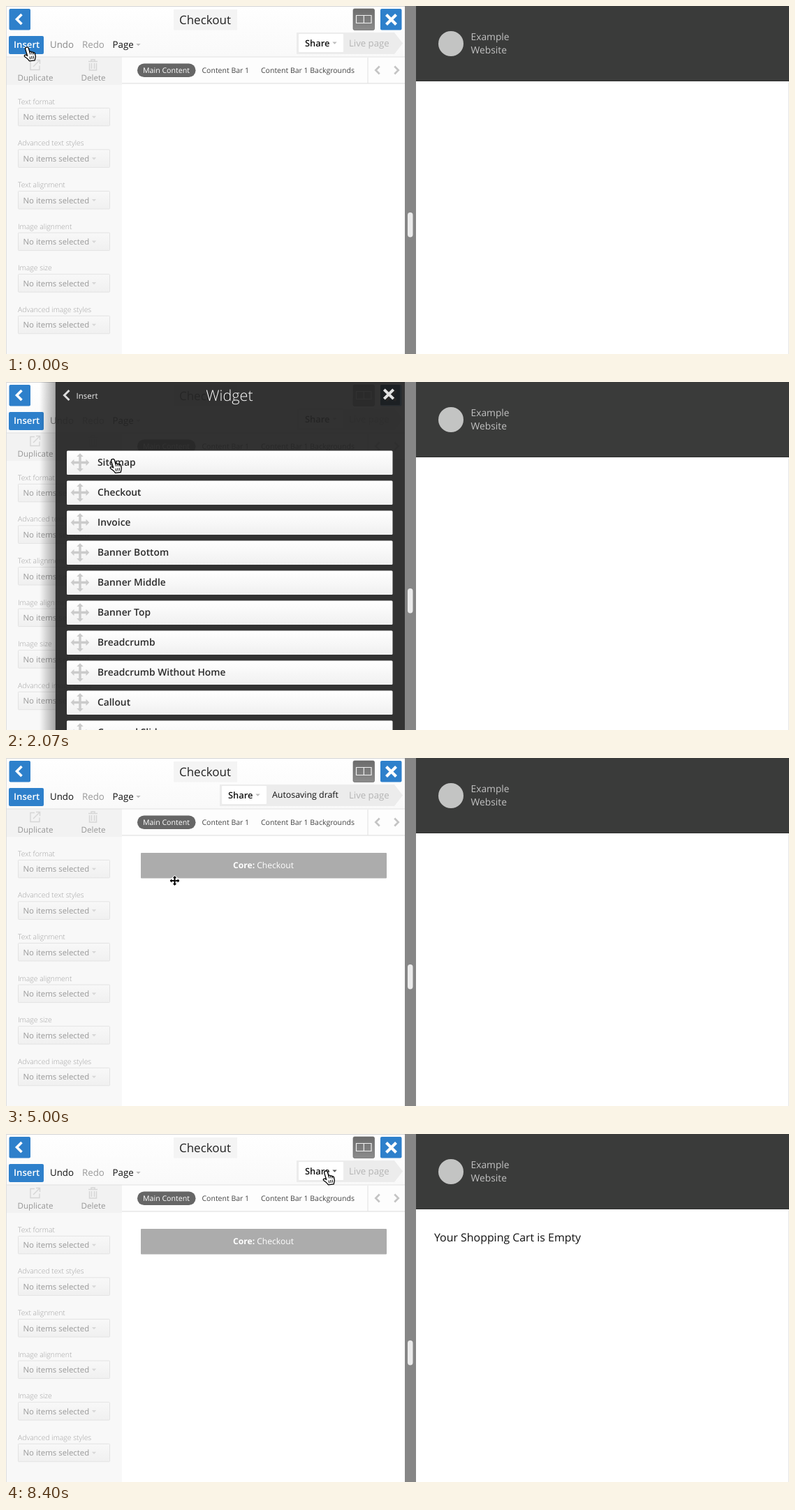
These frames come from a looping animation (1121 px wide and 499 px high, 9.67 s). An HTML page:

```html
<!DOCTYPE html>
<html lang="en">
<head>
<meta charset="utf-8">
<title>Page editor</title>
<style>
html, body { margin: 0; width: 100%; height: 100%; overflow: hidden; background: #fff }
svg { display: block; width: 1121px; height: 499px; font-family: "Open Sans", sans-serif; text-rendering: geometricPrecision }
</style>
</head>
<body>
<svg id="stage" viewBox="0 0 1121 499"></svg>
<script>
const LOOP = 9670;
const BLUE = '#2e80cb';

// Markup helpers. Text is placed by the middle of its capitals.
const text = (s, x, y, size, fill, weight = 400, anchor = 'start') =>
  `<text x="${x}" y="${y + size * .36}" font-size="${size}" fill="${fill}" font-weight="${weight}" text-anchor="${anchor}">${s}</text>`;
const rect = (x, y, w, h, fill, rx = 0, more = '') =>
  `<rect x="${x}" y="${y}" width="${w}" height="${h}" fill="${fill}" rx="${rx}" ${more}/>`;
const line = (d, stroke, w = 1, more = '') =>
  `<path d="${d}" fill="none" stroke="${stroke}" stroke-width="${w}" ${more}/>`;
const group = (id, body, more = '') => `<g id="${id}" ${more}>${body}</g>`;
const caret = (x, y, fill) => `<path d="M${x - 3.2} ${y - 1.6}h6.4l-3.2 3.4z" fill="${fill}"/>`;
const chevron = (x, y, r, dir, stroke, w) =>
  line(`M${x - dir * r / 2} ${y - r}l${dir * r} ${r}l${-dir * r} ${r}`, stroke, w);
const cross = (x, y, r, stroke, w) =>
  line(`M${x - r} ${y - r}l${2 * r} ${2 * r}m0 ${-2 * r}l${-2 * r} ${2 * r}`, stroke, w);

// Four-way arrow of radius r.
const fourWay = (x, y, r, more) => {
  const a = r * .36, b = r * .64, c = r * .13;
  const arm = `M0 0H${c}V${-b}H${a}L0 ${-r}L${-a} ${-b}H${-c}V0z`;
  return `<g transform="translate(${x} ${y})" ${more}>` +
    [0, 90, 180, 270].map(q => `<path d="${arm}" transform="rotate(${q})"/>`).join('') + '</g>';
};
const handle = (x, y) => fourWay(x, y, 13.3, 'fill="#cbcbcb"');

const topBar = rect(0, 0, 571, 73, 'url(#bar)') + rect(0, 0, 571, 1, '#d4d4d4') +
  rect(4.5, 4, 30.5, 30.5, BLUE, 2) + chevron(19, 19, 7, -1, '#fff', 3.6) +
  rect(240, 5, 91, 29.5, '#f4f4f4') + text('Checkout', 285, 19.5, 17, '#222', 400, 'middle') +
  rect(497, 4, 30.5, 30.5, 'url(#grey)', 2, 'stroke="#666" stroke-width=".7"') +
  line('M501.5 13.5h21.5v11h-21.5zM512.3 13.5v11', '#eee', 1.2) +
  group('close', rect(536, 4, 30.5, 30.5, BLUE, 2) + cross(551.5, 19.5, 7, '#fff', 4.2)) +
  rect(4, 43, 50, 26, BLUE, 2) + text('Insert', 11, 55.5, 13.2, '#fff', 600) +
  `<g id="undo">${text('Undo', 63, 55.5, 13.3, 'currentColor')}</g>` +
  text('Redo', 109, 55.5, 13.3, '#999') + text('Page', 152.5, 55.5, 13.3, '#111') + caret(189.5, 55.5, '#bbb');

const ribbon = x => `<path d="M${x} 38H556L568 53.5L556 69H${x}z" fill="#ececec"/>`;
const share = x => rect(x, 40, 64, 26, '#fff', 1) + text('Share', x + 9, 53, 12.9, '#111', 600);
const status =
  group('live', ribbon(416) + share(419) + `<g id="caret">${caret(470.5, 53, 'currentColor')}</g>` +
    text('Live page', 491, 53, 13.2, '#b4b4b4')) +
  group('draft', ribbon(306) + share(309) + caret(360.5, 53, '#bbb') +
    text('Autosaving draft', 381, 53, 12.4, '#111') + text('Live page', 491, 53, 13.2, '#b4b4b4')) +
  group('publish', ribbon(368) + rect(371, 40, 121, 26, '#d9531a', 1) +
    text('Publish Changes', 379.5, 53, 13, '#fff', 600) + text('Preview', 501, 53, 13.1, '#b4b4b4'));

const fields = ['Text format', 'Advanced text styles', 'Text alignment', 'Image alignment', 'Image size', 'Advanced image styles'];
const sidebar = rect(0, 73, 166, 426, '#f8f8f8') + rect(0, 73, 166, 40, '#f2f2f2') +
  line('M41 78.500h-6v13h13v-6M39 87l9-9M43 77.500h5.500v5.500', '#d6d6d6', 1.4) +
  line('M118 79.500h13M122 79v-2h5v2M119.500 82v10h10v-10M122.500 82v8M126.500 82v8', '#d6d6d6', 1.5) +
  text('Duplicate', 16.5, 102.5, 11.6, '#979797') + text('Delete', 107.5, 102.5, 11.6, '#979797') +
  fields.map((s, i) => {
    const y = 159.3 + i * 59.6;
    return text(s, 17, y - 22.3, 10.4, '#a2a2a2', 300) +
      rect(17.5, y - 13, 131, 25.5, 'url(#field)', 1, 'stroke="#e3e3e3"') +
      text('No items selected', 24.5, y, 11.4, '#999') + caret(126, y, '#d8d8d8');
  }).join('') + rect(0, 0, 1, 499, '#dedede');

const tabs = rect(166, 74, 405, 37, '#fdfdfd') + rect(0, 72.5, 571, 1, '#e2e2e2') +
  rect(166, 110.500, 405, 1, '#dcdcdc') + rect(517.5, 74, 1, 37, '#e2e2e2') +
  rect(188, 82.500, 83.5, 19.5, '#666', 9.7) + text('Main Content', 196, 92, 10.6, '#fff') +
  text('Content Bar 1', 280.5, 92, 10.5, '#444') + text('Content Bar 1 Backgrounds', 365, 92, 10.5, '#444') +
  chevron(532, 92, 5.5, -1, '#c4c4c4', 2.6) + chevron(559, 92, 5.5, 1, '#c4c4c4', 2.6);

const widget = group('widget', rect(193, 136, 352, 36.5, '#acacac', 1) +
  text('<tspan font-weight="700">Core:</tspan> Checkout', 368.5, 154, 12.1, '#fff', 400, 'middle'));

// Slide-in panel, in its own coordinates.
const rowBox = i => rect(17, 98.5 + 43 * i, 466.5, 34.5, 'url(#row)', 1.5);
const rowBody = (s, y) => handle(36, y) + text(s, 61, y, 13.8, '#2b2b2b', 600);
const names = ['Sitemap', 'Checkout', 'Invoice', 'Banner Bottom', 'Banner Middle', 'Banner Top',
  'Breadcrumb', 'Breadcrumb Without Home', 'Callout', 'Carousel Slider'];
const panel = group('panel',
  rect(-22, 0, 22, 499, 'url(#shade)') + rect(0.500, 0, 520, 499, '#262626', 0, 'opacity=".94"') +
  group('menu', text('Insert', 250, 19.5, 21.6, '#fff', 300, 'middle') + rowBox(0) + rowBody('Widget', 115.5)) +
  group('list', rect(466, 4, 28, 29, '#000', 1, 'opacity=".25"') + chevron(17, 19, 7, -1, '#ddd', 3) +
    text('Insert', 30.500, 19.5, 11.5, '#eee') + text('Widget', 250, 19.5, 21.6, '#fff', 300, 'middle') +
    names.map((s, i) => rowBox(i) + group('row' + i, rowBody(s, 115.5 + 43 * i))).join('')) +
  cross(478, 17.5, 6.7, '#e2e2e2', 4));

const dragged = group('dragged', rect(-1, 2, 180, 35, '#000', 2, 'opacity=".12"') +
  rect(0, 0, 178, 34, 'url(#row)', 1.5) + handle(18, 16.5) + text('Checkout', 44, 16.5, 13.8, '#2b2b2b', 600), 'opacity=".94"');

const ticks = Array.from({ length: 12 }, (_, i) =>
  `<path d="M0 -16V-30" stroke="#fff" stroke-width="5" stroke-linecap="round" opacity="${(i + 1) / 12}" transform="rotate(${i * 30})"/>`).join('');
const busy = group('busy', rect(244, 193, 249, 224, '#555', 8, 'opacity=".7"') +
  `<g transform="translate(368.5 305)">${group('spinner', ticks)}</g>`);

const site = rect(571, 0, 16, 499, '#868686') + rect(575, 296, 7.5, 35.5, '#ebebeb', 3.7) +
  rect(587, 0, 534, 499, '#fff') + rect(1120, 108, 1, 391, '#e6e6e6') +
  rect(587, 0, 534, 108, '#3a3b3a') + rect(587, 107, 534, 1, '#2f302f') +
  '<circle cx="637" cy="54" r="18" fill="#c3c4c3"/>' +
  text('Example', 665.5, 44.5, 13.8, '#c2c2c2') + text('Website', 665.5, 63.5, 13.8, '#c2c2c2') +
  group('cart', text('Your Shopping Cart is Empty', 613, 148.5, 15.9, '#111'));

const cursors = group('hand',
  '<path d="M4.200 1.200c1.500-.9 2.800.2 3.100 1.400l1.500 5.200c.6-.9 2.200-.8 2.700.5.7-.8 2.200-.6 2.600.6.8-.5 1.900-.1 2.300.9.8 2.600 1.400 4.600.6 6.800l-.8 3.400-7.600.8c-1.600-2.400-4-4.400-6.600-6.100-1.700-1.200-.4-3.100 1.600-2.500l2 1-2.900-9.300c-.3-1 .4-2.300 1.500-2.700z" fill="#fff" stroke="#000" stroke-width="1.300"/>' +
  line('M8.800 8l1 3.500M11.500 8.500l.9 3M14.100 9l.7 2.500M9 14.500l.8 4M11.500 14l.7 4M14 13.500l.5 4', '#000', 1)) +
  group('mover', fourWay(0, 0, 6.7, 'fill="#000" stroke="#fff" stroke-width="1.800" paint-order="stroke"') + fourWay(0, 0, 6.7, ''));

const ramp = (id, a, b) => `<linearGradient id="${id}" x2="0" y2="1"><stop stop-color="${a}"/><stop offset="1" stop-color="${b}"/></linearGradient>`;
document.getElementById('stage').innerHTML = '<defs>' +
  ramp('bar', '#fff', '#f9f9f9') + ramp('grey', '#6c6c6c', '#8c8c8c') + ramp('field', '#f8f8f8', '#f0f0f0') + ramp('row', '#fff', '#f0f0f0') +
  '<linearGradient id="shade"><stop stop-opacity="0"/><stop offset="1" stop-opacity=".32"/></linearGradient></defs>' +
  rect(0, 0, 571, 499, '#fff') + topBar + status + sidebar + tabs + widget + busy + panel + dragged + site + cursors;

const $ = Object.fromEntries([...document.querySelectorAll('g[id]')].map(g => [g.id, g]));
const show = (name, on) => { $[name].style.display = on ? '' : 'none'; };
const move = (name, x, y) => $[name].setAttribute('transform', `translate(${x} ${y})`);
const part = (t, a, b) => Math.min(1, Math.max(0, (t - a) / (b - a)));
const easeOut = p => 1 - (1 - p) ** 3;
const easeInOut = p => p < .5 ? 2 * p * p : 1 - 2 * (1 - p) ** 2;

// Stops are [time, x, y]; each leg is eased.
function along(t, stops) {
  let [, x, y] = stops[0];
  for (let i = 1; i < stops.length; i++) {
    const p = easeInOut(part(t, stops[i - 1][0], stops[i][0]));
    x += (stops[i][1] - x) * p;
    y += (stops[i][2] - y) * p;
  }
  return [x, y];
}
const handStops = [[1070, 25, 58], [1670, 148, 109.5], [5870, 148, 109.5], [5871, 237, 168], [6070, 453, 52]];
const moverStops = [[2600, 157, 119], [3200, 189, 161], [3600, 189, 161], [3730, 215, 162], [4130, 241.5, 176]];

function draw(t) {
  const enter = easeOut(part(t, 730, 1000)), leave = easeInOut(part(t, 3600, 4030));
  show('panel', t >= 730 && t < 4030);
  move('panel', 595 - 525 * enter + 501 * leave, 0);
  show('menu', t >= 1070 && t < 2070);
  show('list', t >= 2070);
  show('row1', t < 3600);

  const dropped = t >= 4530, publish = t >= 5870 && t < 7530;
  show('live', !dropped || t >= 7530);
  show('draft', dropped && t < 5870);
  show('publish', publish);
  show('widget', dropped);
  $.undo.style.color = dropped ? '#111' : '#888';
  $.caret.style.color = t >= 8400 ? '#555' : '#bbb';
  $.close.style.opacity = !dropped || t >= 5000 ? 1 : t < 4930 ? .5 : .8;

  show('busy', t >= 6530 && t < 8070);
  $.busy.style.opacity = part(t, 6530, 6800) * (1 - part(t, 7800, 8070));
  $.spinner.setAttribute('transform', `rotate(${Math.floor(t / 67) * 30})`);
  show('cart', t >= 7270);

  const dragging = t >= 2600 && t < 5870;
  const [mx, my] = along(t, moverStops);
  show('mover', dragging);
  show('hand', !dragging);
  move('mover', mx, my);
  move('hand', ...along(t, handStops));
  show('dragged', t >= 3600 && !dropped);
  move('dragged', mx - 102, my - 16.5);
}

function tick() {
  draw(performance.now() % LOOP);
  requestAnimationFrame(tick);
}
tick();
</script>
</body>
</html>
```
